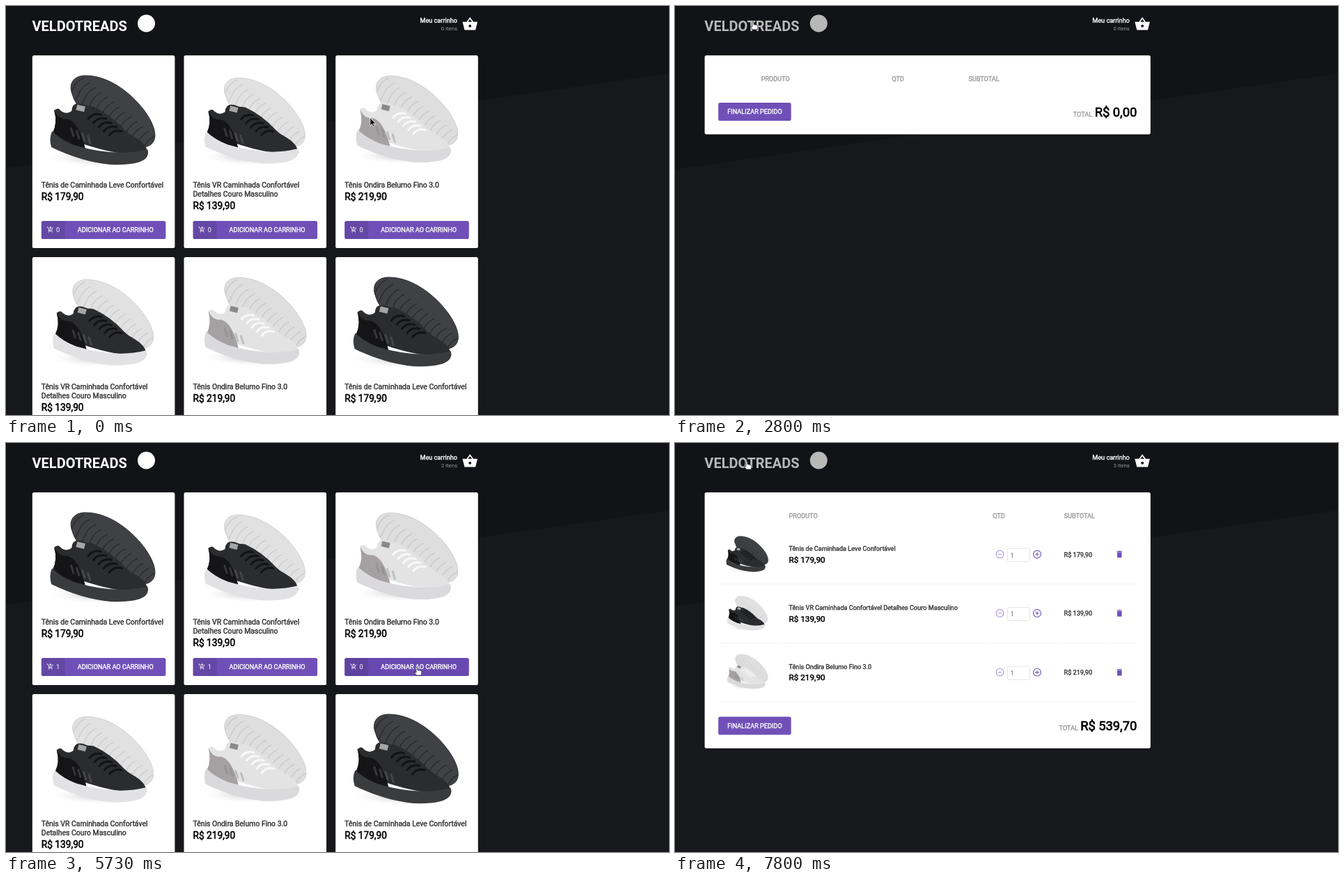
Animation of 952x588 px, one loop 8 s. Source, as an HTML page:

```html
<!DOCTYPE html>
<html lang="pt-BR">
<head>
<meta charset="utf-8">
<title>Loja de tênis</title>
<style>
html, body { margin: 0; width: 100%; height: 100%; overflow: hidden; background: #17181b; }
svg { display: block; width: 952px; height: 588px; }
text { font-family: Roboto, Arial, sans-serif; font-weight: 400; fill: var(--c); white-space: pre; }
.b { stroke: var(--c); stroke-width: .04em; }
.logo { font-weight: 700; }
.line { fill: none; stroke: #fff; stroke-width: 2; stroke-linecap: round; }
</style>
</head>
<body>
<svg id="stage" viewBox="0 0 952 588"></svg>
<script>
const PURPLE = '#7050b8';
const ICON = {
  basket: 'M17 9L12 2 7 9H1l3 12h16l3-12zM9 9l3-4 3 4zm3 8a2 2 0 1 1 0-4 2 2 0 0 1 0 4z',
  add: 'M12 2v6M9 5h6M1 3h2.5l4.3 9H16l3.5-7M7.5 12l-2 4H18M7 20h.2M17 20h.2',
  trash: 'M6 7h12v14H6zM5 4h4l1-1h4l1 1h4v2H5z'
};
const BLACK = { upper: '#2b2c2e', heel: '#151517', lace: '#131315', tag: '#a5a5a6' };
const MODELS = [
  { name: ['Tênis de Caminhada Leve Confortável'], price: '179,90', at: 'translate(0 0)',
    ...BLACK, sole: '#404144', rib: '#2c2d2f', mid: '#3a3b3d' },
  { name: ['Tênis VR Caminhada Confortável', 'Detalhes Couro Masculino'], price: '139,90', at: 'translate(4 4) scale(.96)',
    ...BLACK, sole: '#e1e1e2', rib: '#d0d0d2', mid: '#e2e2e4' },
  { name: ['Tênis Ondira Belumo Fino 3.0'], price: '219,90', at: 'translate(4 1) scale(.97)',
    sole: '#dedede', rib: '#cccccd', upper: '#e3e3e4', mid: '#dadadc', heel: '#a5a1a3', lace: '#f8f8f8', tag: '#8b898a' }
];
const SHAPE = {
  sole: 'M36 40C32 26 40 16 56 16C92 16 126 45 143 70C164 101 158 121 132 119L60 75Q41 60 36 40Z',
  upper: 'M9 98Q16 84 11 66Q17 61 20 66Q28 73 36 67Q37 50 57 59L66 60Q92 72 112 94C124 106 142 108 146 128Q100 136 9 98Z',
  heel: 'M9 98Q16 84 11 66Q18 80 28 78Q46 80 56 122Q26 114 9 98Z',
  mid: 'M8 96Q3 106 7 119Q50 140 92 144Q152 146 145 122Q100 134 40 116Q20 108 8 96Z'
};

const text = (x, y, size, s, c = '#fff', extra = 'class="b"') =>
  `<text x="${x}" y="${y}" font-size="${size}" style="--c:${c}" ${extra}>${s}</text>`;
const rect = (x, y, w, h, fill, r = 2.6, extra = '') =>
  `<rect x="${x}" y="${y}" width="${w}" height="${h}" rx="${r}" fill="${fill}" ${extra}/>`;
const path = (d, fill, extra = '') => `<path d="${d}" fill="${fill}" ${extra}/>`;
const icon = (name, x, y, k, fill, extra = '') =>
  path(ICON[name], fill, `transform="translate(${x} ${y}) scale(${k})" ${extra}`);
const repeat = (n, f) => [...Array(n).keys()].map(f).join('');

function shoe(m) {
  const ribs = repeat(15, i => `M${22 + i * 8.5} ${52 + i * 7}q10 -2 15 -15t17 -18`);
  const laces = repeat(5, i => `M${60 + i * 7.5} ${78 + i * 6}q7 -9 18 -6`);
  const straps = repeat(4, i => `M${35 + i * 8} ${91 + i * 3.5}l4 13`);
  return `<g transform="${m.at}">
    <ellipse cx="78" cy="134" rx="80" ry="14" fill="url(#shade)"/>
    ${path(SHAPE.sole, m.sole)}
    ${path(ribs, 'none', `stroke="${m.rib}" stroke-width="1.8" clip-path="url(#soleClip)"`)}
    ${path(SHAPE.sole, 'none', `stroke="${m.rib}"`)}
    ${path(SHAPE.upper, m.upper)}
    ${path(SHAPE.heel, m.heel)}
    ${path(straps, 'none', 'stroke="#777" stroke-opacity=".35" stroke-width="3"')}
    ${path(laces, 'none', `stroke="${m.lace}" stroke-width="3.2" stroke-linecap="round"`)}
    ${path(SHAPE.mid, m.mid)}
    ${rect(43, 59, 12, 8, m.tag, 0, 'transform="rotate(14 49 63)"')}
  </g>`;
}

function card(i) {
  const id = (i + (i > 2)) % 3, m = MODELS[id];
  const x = 37.8 + (i % 3) * 217.7, y = 71 + Math.floor(i / 3) * 290;
  return `<g transform="translate(${x} ${y})">
    ${rect(0, 0, 204.6, 277, '#fff')}
    <g transform="translate(20.4 13)">${shoe(m)}</g>
    ${m.name.map((s, k) => text(13, 189.5 + k * 13, 10.45, s, '#333')).join('')}
    ${text(13, 195 + m.name.length * 13, 13.71, 'R$ ' + m.price, '#000')}
    ${rect(13, 238, 178.6, 26, PURPLE, 2.6, `class="buy${i}"`)}
    ${rect(13, 238, 34, 26, '#000', 2.6, 'opacity=".1"')}
    ${icon('add', 20.8, 245.6, .435, 'none', 'class="line"')}
    ${text(34.3, 254.4, 9.14, '0', '#fff', `class="qty${id}"`)}
    ${text(119.5, 254.4, 9.14, 'ADICIONAR AO CARRINHO', '#fff', 'class="b" text-anchor="middle"')}
  </g>`;
}

function row(m, i) {
  const y = 160 + i * 84.8, edges = [64, 156, 448, 551, 624, 663.5];
  const rule = repeat(5, k => `M${edges[k]} ${y + 42.7}H${edges[k + 1] - 1.5}`);
  const button = (x, sign, opacity) => `<g fill="none" stroke="${PURPLE}" stroke-width="1.1" opacity="${opacity}">
    <circle cx="${x}" cy="${y}" r="5.4"/><path d="M${x - 2.7} ${y}h5.4${sign}"/></g>`;
  return `<g transform="translate(71.5 ${y - 32.5}) scale(.4)">${shoe(m)}</g>
    ${text(163.5, y - 4.6, 9.14, m.name.join(' '), '#333')}
    ${text(163.5, y + 11.8, 11.76, 'R$ ' + m.price, '#000')}
    ${button(466.5, '', .6)}${button(520, 'm-2.7 -2.7v5.4', 1)}
    ${rect(477.4, y - 8.4, 32, 19, '#fff', 2, 'stroke="#ddd" stroke-width=".8"')}
    ${text(481.5, y + 4.6, 9.14, '1', '#666', '')}
    ${text(558.6, y + 3.6, 9.14, 'R$ ' + m.price, '#333')}
    ${icon('trash', 631.7, y - 6.6, .544, PURPLE)}
    ${path(rule, 'none', 'stroke="#eee" stroke-width=".8"')}`;
}

function cart(id, cols, rows, total, totalX) {
  const dy = rows.length * 84.85;
  return `<g id="${id}">
    ${rect(42.6, 71, 640.2, 113.4 + dy, '#fff')}
    ${['PRODUTO', 'QTD', 'SUBTOTAL'].map((s, i) => text(cols[i], 108.2, 9.14, s, '#999')).join('')}
    ${rows.map(row).join('')}
    ${rect(62.2, 139 + dy, 104.5, 26, PURPLE)}
    ${text(114.5, 155.3 + dy, 9.14, 'FINALIZAR PEDIDO', '#fff', 'class="b" text-anchor="middle"')}
    ${text(totalX, 158.5 + dy, 9.14, 'TOTAL', '#999')}
    ${text(663.2, 158.5 + dy, 18.29, 'R$ ' + total, '#000', 'class="b" text-anchor="end"')}
  </g>`;
}

const stage = document.getElementById('stage');
stage.innerHTML = `
  <defs>
    <clipPath id="soleClip"><path d="${SHAPE.sole}"/></clipPath>
    <radialGradient id="shade"><stop stop-color="#bbb"/><stop offset="1" stop-color="#fff" stop-opacity="0"/></radialGradient>
  </defs>
  ${rect(0, 0, 952, 588, '#17181b', 0)}
  ${path('', '#121316', 'id="slope"')}
  <g id="header">
    <g id="brand">${text(37.5, 36, 20, 'VELDOTREADS', '#fff', 'class="logo"')}<circle cx="201.5" cy="25" r="12.5" fill="#fff"/></g>
    <g id="mini">
      ${text(648, 24, 9.14, 'Meu carrinho', '#fff', 'class="b" text-anchor="end"')}
      ${text(648, 34.5, 7.84, '', '#999', 'id="count" text-anchor="end"')}
      ${icon('basket', 654.5, 14, .98, '#fff')}
    </g>
  </g>
  <g id="home">${repeat(6, card)}</g>
  ${cart('empty', [123.7, 311.5, 421.4], [], '0,00', 571.8)}
  ${cart('full', [163.5, 456.2, 558.6], MODELS, '539,70', 551.4)}
  <g id="pointer">
    ${path('M0 0V11.5L2.7 9 4.5 13 6.4 12 4.7 8.3H8.3Z', '#111', 'id="arrow" stroke="#fff" stroke-width=".8"')}
    ${path('M-1 1Q0-1 1 1V4.6L5.6 5.4Q8 6 6 12H-.4L-4 7.5-1 8Z', '#fff', 'id="hand" stroke="#222" stroke-width=".7"')}
  </g>`;

// arrival time, x, y; each move fills the last TRAVEL ms before its arrival
const TRAVEL = 270;
const MOVES = [
  [0, 524, 160], [70, 440, 215], [200, 225, 290], [270, 80, 320], [400, 445, 347], [600, 204, 248],
  [800, 400, 394], [930, 583, 115], [1130, 634, 36], [1270, 641, 26], [1870, 641, 62], [2000, 600, 130],
  [2270, 400, 221], [2530, 190, 70], [2670, 118, 8], [2800, 112, 22], [3670, 150, 210], [3870, 165, 383],
  [4000, 150, 322], [4670, 323, 348], [4930, 370, 320], [5470, 470, 380], [5670, 590, 322], [6270, 610, 200],
  [6530, 640, 50], [6660, 636, 28], [6860, 636, 28], [6930, 657, 27], [7330, 330, 146], [7670, 110, 32], [7800, 103, 26]
];
const MINI = [[1130, 1730], [6500, 6960]];
const BRAND = [[2590, 3400], [7590, 9000]];
const BUY = [[3950, 4420], [4750, 5300], [5600, 6090]];
const HAND = [...MINI, ...BRAND, ...BUY, [4420, 4750]];

const $ = s => stage.querySelector(s);
const show = (s, on) => $(s).style.display = on ? '' : 'none';
const clamp = v => Math.min(1, Math.max(0, v));
const hover = (t, spans) => spans.reduce((sum, [a, b]) => sum + clamp((t - a) / 200) - clamp((t - b) / 200), 0);

function movePointer(t) {
  const i = MOVES.findLastIndex(m => m[0] <= t), a = MOVES[i], b = MOVES[i + 1] || a;
  const span = Math.min(TRAVEL, b[0] - a[0]) || 1;
  const k = clamp((t - b[0]) / span + 1);
  $('#pointer').setAttribute('transform', `translate(${a[1] + (b[1] - a[1]) * k} ${a[2] + (b[2] - a[2]) * k})`);
  const hand = HAND.some(([from, to]) => t >= from && t < to);
  show('#arrow', !hand);
  show('#hand', hand);
}

function draw(t) {
  const full = t >= 6800, empty = t >= 1470 && t < 3270, inCart = full || empty;
  const added = [4130, 5200, 5870].map(at => +(t >= at));
  const n = added.filter(Boolean).length;
  show('#home', !inCart);
  show('#empty', empty);
  show('#full', full);
  $('#header').setAttribute('transform', `translate(${inCart ? 4.8 : 0} 0)`);
  $('#slope').setAttribute('d', `M0 0H952V97L0 ${inCart ? 235 : 233}Z`);
  $('#count').textContent = n + (n === 1 ? ' item' : ' itens');
  added.forEach((q, i) => stage.querySelectorAll('.qty' + i).forEach(e => e.textContent = q));
  $('#mini').setAttribute('opacity', 1 - .3 * hover(t, MINI));
  $('#brand').setAttribute('opacity', 1 - .3 * hover(t, BRAND));
  BUY.forEach((span, i) => {
    const k = 10 * hover(t, [span]);
    $('.buy' + i).setAttribute('fill', `rgb(${112 - k},${80 - k},${184 - k})`);
  });
  movePointer(t);
}

const start = performance.now();
(function tick() {
  draw((performance.now() - start) % 8000);
  requestAnimationFrame(tick);
})();
</script>
</body>
</html>
```
